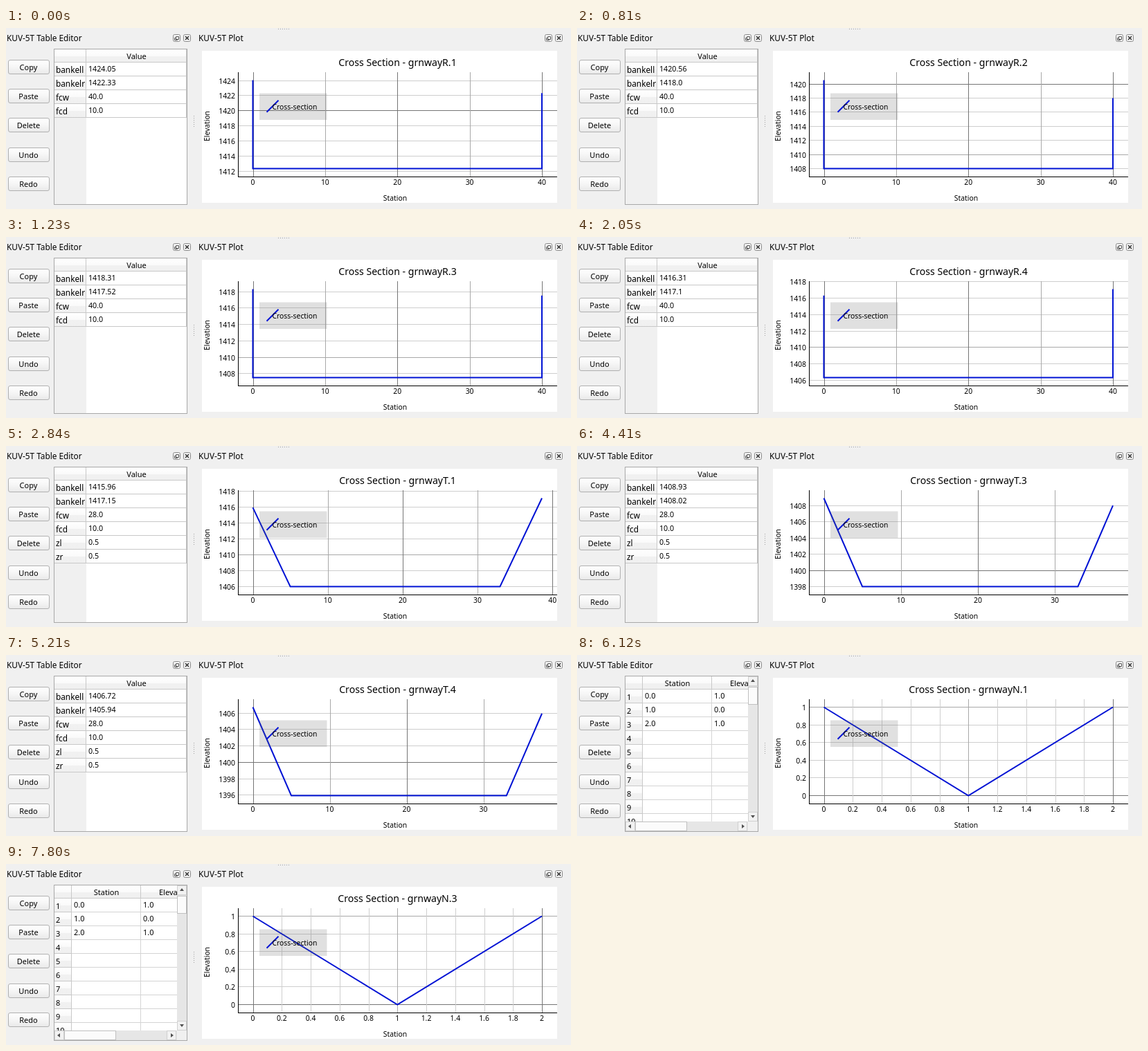
An HTML page for the animation above (8 s loop, 816 px wide and 262 px high).

```html
<!DOCTYPE html>
<html lang="en">
<head>
<meta charset="utf-8">
<title>Cross sections</title>
<style>
html, body { margin: 0; width: 100%; height: 100%; overflow: hidden; background: #f0f0f0; }
svg { display: block; }
text { font: 10.4px "Noto Sans", "Open Sans", sans-serif; fill: #000; }
.mid { text-anchor: middle; }
.end { text-anchor: end; }
</style>
</head>
<body>
<svg width="816" height="262" viewBox="0 0 816 262">
  <defs>
    <linearGradient id="button" x2="0" y2="1"><stop stop-color="#fff"/><stop offset=".5" stop-color="#f6f6f6"/><stop offset="1" stop-color="#e9e9e9"/></linearGradient>
    <linearGradient id="head" x2="0" y2="1"><stop stop-color="#fff"/><stop offset=".5" stop-color="#fafafa"/><stop offset=".51" stop-color="#f1f1f1"/><stop offset="1" stop-color="#f0f0f0"/></linearGradient>
    <clipPath id="cells"><rect x="70" y="31" width="177" height="210"/></clipPath>
    <clipPath id="view"><rect x="335" y="64" width="461" height="152"/></clipPath>
  </defs>
  <g id="frame"></g>
  <g id="table"></g>
  <g id="plot"></g>
</svg>
<script>
const LOOP = 8000;
const NAME = 'KUV-5T';
const BLUE = '#0012d4';

// name, left bank, right bank, bed width, depth, side slope
const sections = [
  ['R.1', 1424.05, 1422.33, 40, 10],
  ['R.2', 1420.56, 1418, 40, 10],
  ['R.3', 1418.31, 1417.52, 40, 10],
  ['R.4', 1416.31, 1417.1, 40, 10],
  ['T.1', 1415.96, 1417.15, 28, 10, 0.5],
  ['T.2', 1412.46, 1411.87, 28, 10, 0.5],
  ['T.3', 1408.93, 1408.02, 28, 10, 0.5],
  ['T.4', 1406.72, 1405.94, 28, 10, 0.5],
  ['N.1'], ['N.2'], ['N.3']
];

// time, section in the table, section in the plot
const steps = [
  [0, 0, 0], [690, 1, 0], [810, 1, 1], [1230, 2, 2], [2050, 3, 3],
  [2840, 4, 4], [3620, 5, 5], [4410, 6, 6], [5210, 7, 7],
  [6000, 8, 7], [6120, 8, 8], [7010, 9, 9], [7800, 10, 10]
];

const el = id => document.getElementById(id);
const rect = (x, y, w, h, fill, more = '') =>
  `<rect x="${x}" y="${y}" width="${w}" height="${h}" fill="${fill}" ${more}/>`;
const box = (x, y, w, h, fill, stroke, r = 0) =>
  rect(x + .5, y + .5, w - 1, h - 1, fill, `stroke="${stroke}" rx="${r}"`);
const path = (d, stroke, width = 1, more = '') =>
  `<path d="${d}" fill="none" stroke="${stroke}" stroke-width="${width}" ${more}/>`;
const text = (x, y, s, size = 10.4, cls = '', more = '') =>
  `<text x="${x}" y="${y}" class="${cls}" style="font-size:${size}px" ${more}>${s}</text>`;
const hline = (x1, x2, y, c) => rect(x1, y, x2 - x1, 1, c);
const vline = (x, y1, y2, c) => rect(x, y1, 1, y2 - y1, c);
const decimal = v => Number.isInteger(v) ? v.toFixed(1) : String(v);
const rowTop = i => 50 + i * 20;

function dockIcons(x) {
  return box(x, 9, 11, 11, '#f4f4f4', '#8a8a8a', 2) + box(x + 15, 9, 11, 11, '#f4f4f4', '#8a8a8a', 2) +
    path(`M${x + 4.5} 12.5h4v4h-4zM${x + 4.5} 14.5h-2v3h4v-1`, '#555') +
    path(`M${x + 18} 12l5 5m0 -5l-5 5`, '#333', 1.5);
}

function drawFrame() {
  let s = rect(0, 0, 816, 262, '#f0f0f0');
  s += text(1, 19, NAME + ' Table Editor', 11.8) + text(278, 19, NAME + ' Plot', 11.8);
  s += dockIcons(241) + dockIcons(778);
  for (let i = 0; i < 6; i++) s += rect(393 + i * 3, 1, 1, 1, '#a0a0a0') + rect(271, 127 + i * 3, 1, 1, '#a0a0a0');
  ['Copy', 'Paste', 'Delete', 'Undo', 'Redo'].forEach((label, i) => {
    const y = Math.floor(46.4 + i * 42.25);
    s += box(3, y, 60, 21, 'url(#button)', '#b0b0b0', 2.5) + text(32.5, y + 15, label, 11, 'mid');
  });
  return s;
}

const headCell = (x, y, w, h) =>
  rect(x, y, w, h, 'url(#head)') + hline(x, x + w, y + h - 1, '#c8c8c8') + vline(x + w - 1, y, y + h, '#c8c8c8');

function drawValues([, left, right, width, depth, slope]) {
  const rows = [['bankell', left], ['bankelr', right], ['fcw', width], ['fcd', depth]];
  if (slope) rows.push(['zl', slope], ['zr', slope]);
  let s = rect(70, 31, 46, 224, '#f0f0f0') + headCell(70, 31, 46, 19) + headCell(116, 31, 145, 19);
  s += text(188.5, 45, 'Value', 11, 'mid');
  rows.forEach(([key, value], i) => {
    const y = rowTop(i);
    s += headCell(70, y, 46, 20) + text(72, y + 14.5, key, 11.8);
    s += hline(116, 261, y + 19, '#c8c8c8') + vline(260, y, y + 20, '#c8c8c8');
    s += text(119, y + 13, decimal(value), 10.7);
  });
  return s;
}

function drawPoints() {
  const points = [['0.0', '1.0'], ['1.0', '0.0'], ['2.0', '1.0']];
  let s = headCell(70, 31, 25, 19) + headCell(95, 31, 100, 19) + headCell(195, 31, 100, 19);
  s += text(145, 45, 'Station', 11, 'mid') + text(221, 45, 'Elevation', 11);
  for (let i = 0; i < 10; i++) {
    const y = rowTop(i);
    s += headCell(70, y, 25, 20) + text(72, y + 14.5, i + 1, 11);
    s += hline(95, 247, y + 19, '#d4d4d4') + vline(194, y, y + 20, '#d4d4d4');
    (points[i] || []).forEach((v, j) => s += text(98 + j * 100, y + 13, v, 10.9));
  }
  s = `<g clip-path="url(#cells)">${s}</g>`;
  s += rect(247, 31, 14, 210, '#e6e6e6') + rect(70, 241, 177, 14, '#e6e6e6') + rect(247, 241, 14, 14, '#f0f0f0');
  for (const [x, y] of [[247, 31], [247, 227], [70, 241], [232, 241]]) s += box(x, y, 14, 14, '#f2f2f2', '#d0d0d0');
  s += box(247, 46, 14, 26, '#fbfbfb', '#c0c0c0') + box(84, 241, 75, 14, '#fbfbfb', '#c0c0c0');
  s += '<path fill="#505050" d="M251 39h6l-3 -4zM251 232h6l-3 4zM78 245v6l-4 -3zM238 245v6l4 -3z"/>';
  return s;
}

function drawTable(section) {
  return box(69, 30, 193, 226, '#fff', '#a8a8a8') + (section.length > 1 ? drawValues(section) : drawPoints());
}

// Corner points as [station, elevation]
function profile([, left, right, width, depth, slope = 0]) {
  if (left === undefined) return [[0, 1], [1, 0], [2, 1]];
  const bed = Math.min(left, right) - depth;
  const a = depth * slope, b = a + width;
  return [[0, left], [a, bed], [b, bed], [b + (depth + right - left) * slope, right]];
}

const gridColor = (i, perMajor) =>
  i % (2 * perMajor) === 0 ? '#757575' : i % perMajor === 0 ? '#a8a8a8' : '#cecece';

function drawPlot(section) {
  const pts = profile(section), small = section.length === 1;
  const xEnd = pts[pts.length - 1][0], ys = pts.map(p => p[1]);
  const low = Math.min(...ys), high = Math.max(...ys);
  const X = v => 356.5 + v / xEnd * 417.5;
  const Y = v => 203.5 - (v - low) / (high - low) * 128;
  const label = v => String(+v.toFixed(1));
  const xStep = small ? .2 : 10, yStep = small ? .2 : 2;
  let s = rect(283, 33, 513, 220, '#fff');

  for (let i = Math.ceil(low / yStep) - 3; Y(i * yStep) >= 64; i++) {
    const y = Y(i * yStep);
    if (y > 215) continue;
    s += hline(335, 796, Math.floor(y), gridColor(i, 5)) + text(331, y + 4.5, label(i * yStep), 10.4, 'end');
  }
  for (let i = 0; X(i * xStep) < 796; i++) {
    const x = X(i * xStep);
    s += vline(Math.round(x), 64, 215, gridColor(i, small ? 5 : 1)) + text(x, 227, label(i * xStep), 10.4, 'mid');
  }
  s += vline(335, 64, 216, '#000') + hline(335, 796, 215, '#000');
  s += path('M' + pts.map(([x, y]) => X(x).toFixed(2) + ' ' + Y(y).toFixed(2)).join('L'), BLUE, 2, 'clip-path="url(#view)"');

  s += rect(366, 94.5, 97.5, 38.5, '#646464', 'fill-opacity=".2"');
  s += path('M376.5 121.8L393.5 104.8', BLUE, 2) + text(384.5, 118, 'Cross-section', 10.35);
  s += text(565.5, 55, 'Cross Section - grnway' + section[0], 14.1, 'mid');
  s += text(562, 250, 'Station', 10.4, 'mid');
  s += text(0, 0, 'Elevation', 10.3, 'mid', 'transform="translate(294 142) rotate(-90)"');
  return s;
}

el('frame').innerHTML = drawFrame();
let shown;
function tick() {
  const t = performance.now() % LOOP;
  const step = steps.filter(s => s[0] <= t).pop();
  if (step !== shown) {
    shown = step;
    el('table').innerHTML = drawTable(sections[step[1]]);
    el('plot').innerHTML = drawPlot(sections[step[2]]);
  }
  requestAnimationFrame(tick);
}
tick();
</script>
</body>
</html>
```
